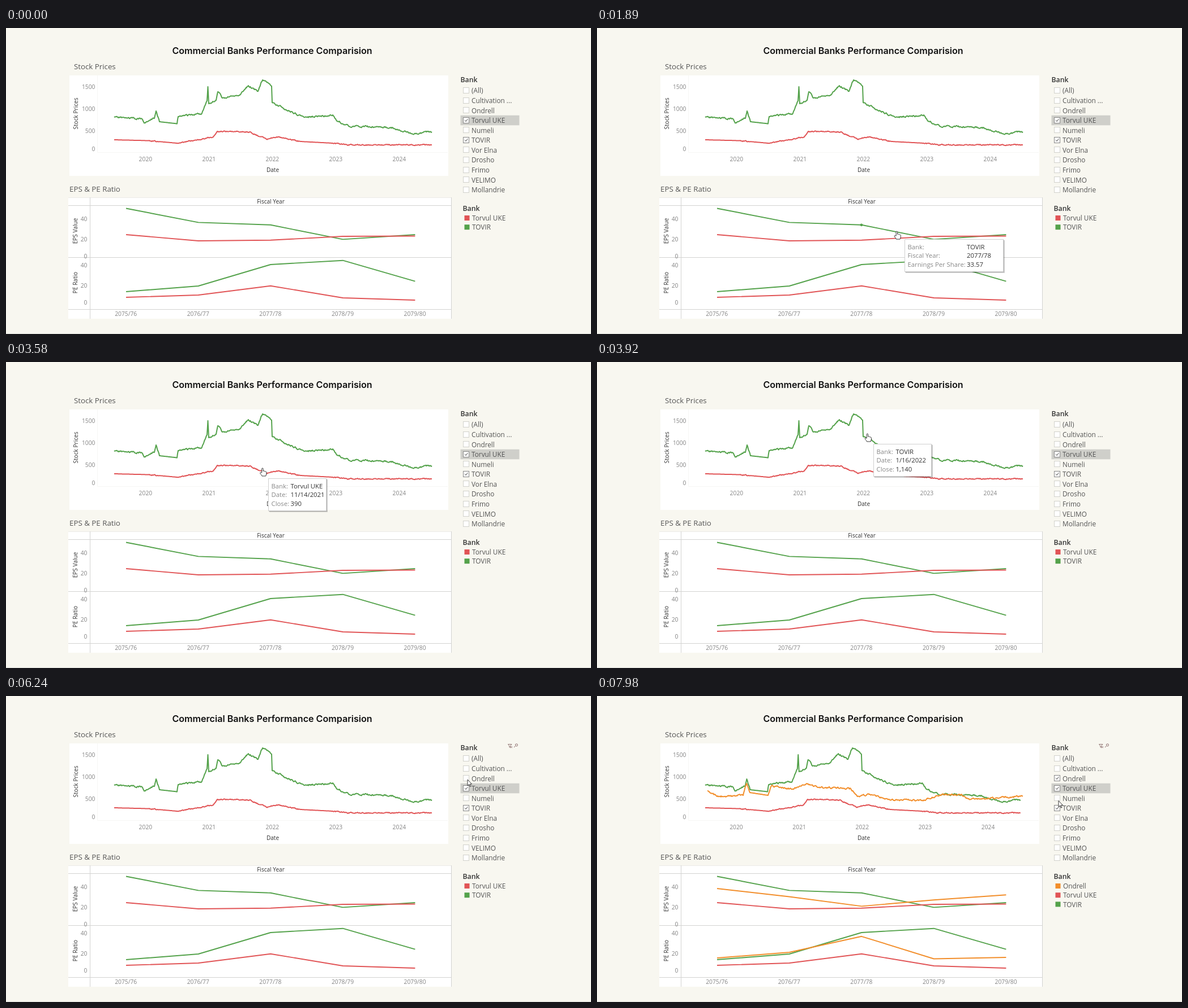
Recreate the animation shown at these times as an HTML page. Size 1033 px wide and 542 px high, loop 8000 ms.

```html
<!DOCTYPE html>
<html lang="en">
<head>
<meta charset="utf-8">
<title>Dashboard</title>
<style>
html, body { margin: 0; width: 100%; height: 100%; overflow: hidden; background: #f8f7f0; }
svg { display: block; width: 1033px; height: 542px; font-family: "Open Sans", "Noto Sans", sans-serif; }
</style>
</head>
<body>
<svg id="stage" viewBox="0 0 1033 542"></svg>
<script>
const LOOP = 8000;
const GREEN = '#54a24b', RED = '#e15456', ORANGE = '#f28e2b';
const BANKS = ['(All)', 'Cultivation ...', 'Ondrell', 'Torvul UKE', 'Numeli', 'TOVIR',
  'Vor Elna', 'Drosho', 'Frimo', 'VELIMO', 'Mollandrie'];
const [NEW, LOW, TOP] = [BANKS[2], BANKS[3], BANKS[5]];

function random(seed) {
  return () => {
    seed = (seed * 1664525 + 1013904223) >>> 0;
    return seed / 4294967296;
  };
}

// A price curve through a few turning points, with seeded daily wander outside the calm spans
function price(points, amp, seed, calm = []) {
  const rnd = random(seed), still = [[270, 303], ...calm];
  let wander = 0, d = 'M' + points[0];
  points.slice(1).forEach(([x1, y1], i) => {
    const [x0, y0] = points[i], n = Math.ceil((x1 - x0) / 1.2);
    for (let j = 1; j <= n; j++) {
      const u = j / n, x = x0 + (x1 - x0) * u;
      const quiet = still.some(([a, b]) => x > a && x < b);
      wander = quiet || u === 1 ? 0 : wander * .6 + (rnd() - .5) * 2 * amp;
      d += `L${x.toFixed(1)} ${(y0 + (y1 - y0) * u + wander).toFixed(1)}`;
    }
  });
  return d;
}

const topPrice = price([[191, 158], [240, 161], [245, 168], [262, 160], [265, 147], [271, 166], [302, 169.5],
  [304, 157], [346, 151], [355, 129], [356.5, 104], [358, 134], [371, 128], [374, 113], [382, 124], [412, 119],
  [428, 102], [445, 112], [453, 92], [469, 103], [470, 132], [500, 147], [528, 158], [577, 154], [583, 163],
  [605, 174], [680, 176], [715, 187], [752, 184]], 1.3, 11);
const lowPrice = price([[191, 198], [252, 199.5], [302, 204], [346, 197], [366, 193], [373, 183], [430, 184],
  [460, 197], [480, 193], [520, 201], [577, 204], [605, 207], [752, 207]], .8, 7, [[191, 252], [520, 577]]);
const newPrice = price([[195, 168], [212, 178], [258, 176], [264, 155], [270, 171], [302, 176], [308, 159],
  [345, 165], [372, 156], [390, 162], [448, 164], [460, 178], [480, 174], [520, 184], [575, 185], [612, 174],
  [640, 174], [660, 183], [700, 181], [752, 177]], 1.3, 5);

const text = (s, x, y, size, fill = '#555', more = '') =>
  `<text x="${x}" y="${y + size * .36}" font-size="${size}" fill="${fill}" ${more}>${s.replace('&', '&amp;')}</text>`;
const mid = 'text-anchor="middle"', end = 'text-anchor="end"', bold = 'font-weight="600"', medium = 'font-weight="500"';
const rect = (x, y, w, h, fill, more = '') =>
  `<rect x="${x}" y="${y}" width="${w}" height="${h}" fill="${fill}" ${more}/>`;
const stroke = (d, color, w = 1, more = '') =>
  `<path d="${d}" fill="none" stroke="${color}" stroke-width="${w}" stroke-linejoin="round" ${more}/>`;
const tick = (s, x, y, anchor, more = '') => text(String(s), x, y, 10.3, '#858585', anchor + ' ' + more);
const upright = (s, x, y) =>
  `<g transform="translate(${x} ${y}) rotate(-90)">${text(s, 0, 0, 10.1, '#333', mid + ' ' + medium)}</g>`;

const yearX = i => 212 + i * 127.6;
const dateX = i => 246.4 + i * 112;
const trend = (ys, color) => stroke('M' + ys.map((y, i) => `${yearX(i)} ${y}`).join('L'), color, 1.9);
const rowY = i => 111 + i * 17.57;
const boxY = i => Math.round(rowY(i) - 6) + .5;
const tickMark = i => stroke(`M810.2 ${boxY(i) + 4.8}l1.9 2.2 3.2 -4.4`, '#444');

function filterRow(name, i) {
  const y = rowY(i), on = name === LOW || name === TOP;
  return (name === LOW ? rect(802.5, y - 9, 104, 17.6, '#cfcfca') : '') +
    rect(807.5, boxY(i), 10, 10, '#fff', `id="box${i}" stroke="${on ? '#888' : '#d2d2cc'}"`) +
    (on ? tickMark(i) : '') + text(name, 822, y + .2, 11.8);
}

const legend = (items, id) => `<g id="${id}">` + items.map(([name, color], i) =>
  rect(809.5, 332 + i * 16.2, 9, 9, color) + text(name, 823, 337 + i * 16.2, 11.8)).join('') + '</g>';

const stage = document.getElementById('stage');
stage.innerHTML =
  rect(0, 0, 1033, 542, '#f8f7f0') + stroke('M0 541.5H1033', '#dfdfda') +
  text('Commercial Banks Performance Comparision', 470, 39.8, 16.1, '#111', `${mid} ${bold} font-family="Inter, sans-serif"`) +

  text('Stock Prices', 120, 68.5, 13.3) +
  rect(112, 84, 669, 178, '#fff') + stroke('M161.5 84V220.5H780', '#f6f6f4') +
  [1500, 1000, 500].map((v, i) => tick(v, 157.5, 104 + i * 39, end)).join('') + tick(0, 157.5, 214, end) +
  [0, 1, 2, 3, 4].map(i => tick(2020 + i, dateX(i), 232, mid, 'class="date"')).join('') +
  text('Date', 471, 251, 10.1, '#333', mid + ' ' + medium) + upright('Stock Prices', 123.5, 151.5) +
  '<g id="prices">' + stroke(topPrice, GREEN, 2) + stroke(lowPrice, RED, 2) + '</g>' +
  stroke(newPrice, ORANGE, 2, 'class="added"') +

  text('EPS & PE Ratio', 112, 285.6, 13.3) +
  rect(110, 300, 676, 215, '#fff') + stroke('M110 300.5H786', '#ebebe8') +
  stroke('M110 314.5H786M110 406.5H786M110 498.5H786M148.5 300V515M786.5 300V515', '#d3d3d1') +
  text('Fiscal Year', 467.5, 307.7, 10.1, '#333', mid + ' ' + medium) +
  upright('EPS Value', 122, 359.5) + upright('PE Ratio', 122, 451) +
  [338, 420.5].map(y => tick(40, 143.5, y, end) + tick(20, 143.5, y + 36, end) + tick(0, 143.5, y + 66, end)).join('') +
  [0, 1, 2, 3, 4].map(i => tick(`${2075 + i}/${76 + i}`, yearX(i) - .3, 506.5, mid)).join('') +
  trend([319.5, 344.4, 348.8, 374.4, 366], GREEN) + trend([366, 377, 375.8, 369, 368.5], RED) +
  trend([467, 457, 419, 411.7, 448.6], GREEN) + trend([477, 473, 456.8, 478, 482], RED) +
  '<g class="added">' + trend([341, 355.5, 372.4, 361.2, 352.2], ORANGE) +
  trend([464, 454, 425.8, 465.5, 463], ORANGE) + '</g>' +
  '<circle id="dot" cx="467" r="2.4"/>' +

  text('Bank', 802.5, 91.3, 12.3, '#333', bold) + BANKS.map(filterRow).join('') +
  `<g id="newTick">${tickMark(2)}</g>` +
  '<g id="icons">' + stroke('M886.5 85.5h6.5l-2.6 3v3l-1.6-1v-2zM891 89l3 3m0-3l-3 3', '#8a6a6a', .9) +
  stroke('M899.5 87.5a2 2 0 1 1 1.2 1.2zM899.6 88.4L897 91', '#8a6a6a') + '</g>' +
  text('Bank', 806.5, 319.3, 12.3, '#333', bold) +
  legend([[LOW, RED], [TOP, GREEN]], 'before') +
  legend([[NEW, ORANGE], [LOW, RED], [TOP, GREEN]], 'after') +

  '<g id="tip"></g><g id="cursor" stroke="#222" stroke-width=".9" stroke-linejoin="round" fill="#fff">' +
  '<path id="arrow" d="M0 0V11L2.6 8.6 4.4 12.6 6 11.9 4.2 8H7.6Z"/>' +
  '<path id="hand" d="M-1.3 8V1.2a1.2 1.2 0 0 1 2.4 0V5.2c1-.8 2-.4 2.2.4 1-.5 1.8 0 2 .7 1-.4 1.6.2 1.6 1.2V10' +
  'c0 1.6-1 2.4-1.2 4H-1c-.4-1.6-2.2-3-3.2-5-.5-1.2.8-2 1.6-1.2z"/></g>';

const $ = id => document.getElementById(id);
const show = (el, on) => el.setAttribute('visibility', on ? 'visible' : 'hidden');

const share = (name, value, y, color) => ({
  w: 175, at: 110, dx: 14, dy: 14, dot: { y, color },
  rows: [['Bank:', name], ['Fiscal Year:', '2077/78'], ['Earnings Per Share:', value]]
});
const close = (name, date, value) => ({
  w: 103, at: 39.5, dx: 10, dy: 18, rows: [['Bank:', name], ['Date:', date], ['Close:', value]]
});
const shareTop = share(TOP, '33.57', 348.8, GREEN);
const shareLow = share(LOW, '17.88', 375.8, '#b9733f');
const closeTop = close(TOP, '1/16/2022', '1,140');
const closeLow = close(LOW, '11/14/2021', '390');

// The pointer passes its path in n steps; each tip gives its content with first and last step
const moves = [
  { from: 580, to: 1210, n: 10, path: [[1013, 529], [834, 250]] },
  { from: 1410, to: 2160, n: 12, path: [[800, 262], [449, 346], [537.5, 361.5], [522, 376]],
    tips: [[shareTop, 6, 10], [shareLow, 11, 12]] },
  { from: 2220, to: 2220, n: 1, path: [[521, 378]], tips: [[shareLow, 1, 1]] },
  { from: 2760, to: 3040, n: 5, path: [[517.5, 377.5], [449.5, 188.5]], tips: [[shareLow, 1, 1]] },
  { from: 3580, to: 3990, n: 7, path: [[453, 188], [456, 182], [470, 128], [485, 126]],
    tips: [[closeLow, 1, 2], [closeTop, 5, 7]] },
  { from: 4130, to: 4820, n: 10, path: [[490, 130], [565, 169], [690, 178], [818, 183]], tips: [[closeTop, 1, 4]] },
  { from: 4950, to: 4950, n: 1, path: [[817, 182]] },
  { from: 5490, to: 6030, n: 7, path: [[817, 179], [815, 148]] },
  { from: 7700, to: 7980, n: 5, path: [[815, 152], [815, 185.5]] }
];

function stepOf(m, t) {
  if (m.n === 1) return 1;
  return Math.min(m.n, 1 + Math.floor((t - m.from) / (m.to - m.from) * (m.n - 1) + .1));
}

function along(path, u) {
  const s = u * (path.length - 1), i = Math.floor(s);
  const a = path[i], b = path[i + 1] || a;
  return a.map((v, j) => v + (b[j] - v) * (s - i));
}

function tooltip(c, x, y) {
  return rect(x + 2, y + 2, c.w, 58, '#000', 'opacity=".16"') + rect(x + 1, y + 1, c.w, 58, '#000', 'opacity=".16"') +
    rect(x + .5, y + .5, c.w - 1, 57, '#fff', 'stroke="#d0d0d0"') +
    c.rows.map(([label, value], i) => text(label, x + 5.5, y + 13.6 + i * 15.8, 11.3, '#888') +
      text(value, x + c.at, y + 13.6 + i * 15.8, 11.3, '#333', medium)).join('');
}

function drawPointer(t) {
  const m = moves.filter(v => t >= v.from).pop();
  const k = m ? stepOf(m, t) : 0;
  const [x, y] = m ? along(m.path, (k - 1) / Math.max(1, m.n - 1)) : [0, 0];
  const [tip] = (m && m.tips || []).find(([, first, last]) => k >= first && k <= last) || [];
  const dot = tip && tip.dot;
  show($('hand'), m && tip);
  show($('arrow'), m && !tip);
  show($('icons'), x > 803 && y < 300);
  show($('dot'), dot);
  if (dot) {
    $('dot').setAttribute('cy', dot.y);
    $('dot').setAttribute('fill', dot.color);
  }
  $('cursor').setAttribute('transform', `translate(${x} ${y})`);
  $('tip').innerHTML = tip ? tooltip(tip, Math.round(x + tip.dx), Math.round(y + tip.dy)) : '';
}

const dates = [...document.querySelectorAll('.date')];
const added = [...document.querySelectorAll('.added')];

// The newly ticked bank fades in while the date axis narrows a little
function drawSelection(t) {
  const u = Math.min(1, Math.max(0, (t - 6400) / 370));
  const e = u * u * (3 - 2 * u), scale = 1 - .0075 * e;
  const squeeze = x => 191.4 + (x - 191.4) * scale;
  added.forEach(el => el.setAttribute('opacity', e));
  $('prices').setAttribute('transform', `translate(${squeeze(0)} 0) scale(${scale} 1)`);
  dates.forEach((el, i) => el.setAttribute('x', squeeze(dateX(i))));
  show($('newTick'), t >= 6310);
  $('box2').setAttribute('stroke', t >= 6310 ? '#888' : '#d2d2cc');
  show($('before'), t < 6520);
  show($('after'), t >= 6520);
}

const start = performance.now();
function frame() {
  const t = (performance.now() - start) % LOOP;
  drawPointer(t);
  drawSelection(t);
  requestAnimationFrame(frame);
}
frame();
</script>
</body>
</html>
```
